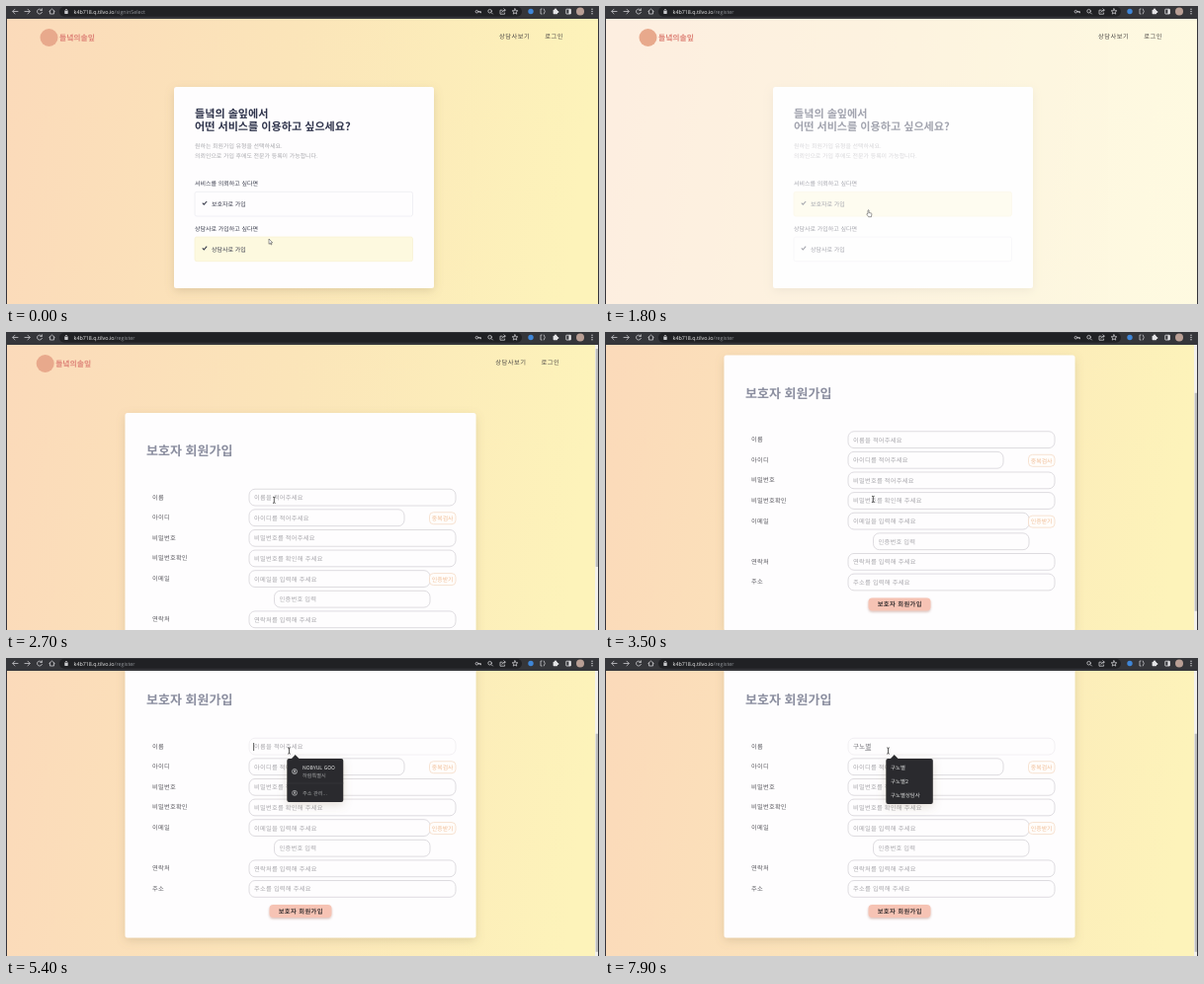
An HTML page that plays this animation: 600x302 px, repeating every 8 s.

```html
<!DOCTYPE html>
<html lang="ko">
<head>
<meta charset="utf-8">
<title>Sign-up flow</title>
<style>
  html, body { margin: 0; width: 100%; height: 100%; overflow: hidden; background: #fff; }
  svg { display: block; width: 100%; height: 100%; }
  text { font-family: "Noto Sans CJK KR", "Noto Sans CJK", "Noto Sans KR", sans-serif; text-rendering: geometricPrecision; white-space: pre; }
  .url { font-family: "Open Sans", "Noto Sans", sans-serif; }
  .icon { fill: none; stroke: #c9cacd; stroke-width: .8; stroke-linecap: round; stroke-linejoin: round; }
  .pointer { fill: #fff; stroke: #444; stroke-width: .55; }
</style>
</head>
<body>
<svg id="stage" viewBox="0 0 600 302" preserveAspectRatio="none">
  <defs>
    <linearGradient id="warm" x2="1" y2=".06">
      <stop stop-color="#fbdaba"/><stop offset=".5" stop-color="#fbe5b9"/><stop offset="1" stop-color="#fdf3ba"/>
    </linearGradient>
    <filter id="soft" x="-20%" y="-20%" width="140%" height="150%">
      <feDropShadow dx="0" dy="3" stdDeviation="5" flood-color="#8c7a55" flood-opacity=".24"/>
    </filter>
    <filter id="lift" x="-20%" y="-40%" width="140%" height="220%">
      <feDropShadow dx="0" dy="1.3" stdDeviation="1.2" flood-color="#a06050" flood-opacity=".4"/>
    </filter>
    <clipPath id="viewport"><rect y="13" width="600" height="289"/></clipPath>
  </defs>
  <rect width="600" height="302" fill="#fff"/>
  <g clip-path="url(#viewport)">
    <g id="view">
      <rect width="600" height="302" fill="url(#warm)"/>
      <g id="select"></g>
      <g id="register"></g>
    </g>
    <g id="header"></g>
    <g id="scrollbar">
      <rect x="596" y="12" width="4" height="290" fill="#f3f1ec"/>
      <rect id="thumb" x="596.7" width="2.3" height="221" fill="#bdbdbd"/>
    </g>
    <path d="M.5 12V302M599.5 12V302" stroke="#35343a"/>
  </g>
  <g id="bar"></g>
  <g id="popups"></g>
  <g id="arrow"><path class="pointer" d="M0 0V5.3L1.3 4.2 2.1 6 2.9 5.7 2.1 3.9H3.7Z"/></g>
  <g id="hand"><path class="pointer" d="M0 .6Q.6-.2 1.1.6V3L3.4 3.5Q4 3.7 3.9 4.6L3.4 7.2H.7L-1.2 4.6Q-.9 3.4 0 4Z"/></g>
  <g id="beam"><path d="M-1.3-3.1Q0-3.1 0-2.4Q0-3.1 1.3-3.1M0-2.4V2.4M-1.3 3.1Q0 3.1 0 2.4Q0 3.1 1.3 3.1" fill="none" stroke="#333" stroke-width=".8"/></g>
</svg>
<script>
const $ = id => document.getElementById(id);
const LOOP = 8000, MAX_SCROLL = 78;
const SITE = "들녘의 솔잎", NAME = "구노별";

// y is the vertical centre of the glyphs
const text = (x, y, s, size, fill, extra = "") =>
  `<text x="${x}" y="${y + size * .38}" font-size="${size}" fill="${fill}" ${extra}>${s}</text>`;
const box = (x, y, w, h, r, fill, stroke = "none", extra = "") =>
  `<rect x="${x}" y="${y}" width="${w}" height="${h}" rx="${r}" fill="${fill}" stroke="${stroke}" stroke-width=".8" ${extra}/>`;
const show = (id, on) => $(id).setAttribute("display", on ? "inline" : "none");
const move = (id, x, y) => $(id).setAttribute("transform", `translate(${x} ${y})`);

const BOLD = 'font-weight="700"', MEDIUM = 'font-weight="500"';
const SPACED = 'letter-spacing=".22"';

function buildBar() {
  const icon = d => `<path class="icon" d="${d}"/>`;
  $("bar").innerHTML =
    box(0, 0, 600, 13, 0, "#35363a") + box(54, .8, 468, 10, 5, "#202124") +
    icon("M12 5.5H7M9 3.2L6.7 5.5 9 7.8") +
    icon("M19 5.5H24M22 3.2L24.3 5.5 22 7.8") +
    icon("M36 4A2.5 2.5 0 1 0 36.4 6.4M36.4 2.8V4.5H34.7") +
    icon("M43.7 5.5L46.5 3 49.3 5.5M44.5 5V8H48.5V5") +
    box(59.3, 5, 3.4, 3, .4, "#c9cacd") + icon("M60 5V4Q61 2.4 62 4V5") +
    `<text class="url" x="68.6" y="7.5" font-size="5.35" fill="#f1f1f1">k4b718.q.tilvo.io<tspan id="path" fill="#92959a"></tspan></text>` +
    `<g id="key"><circle class="icon" cx="476.4" cy="5.7" r="1.3"/>${icon("M478 5.7H480.5V6.8M479.2 5.7V6.6")}</g>` +
    `<circle class="icon" cx="489.6" cy="5.2" r="1.8"/>` + icon("M491.2 6.8L492.4 8") +
    icon("M502 4.2H500V8.2H504.6V7M501.8 6.2Q502 4.2 505 4.2M503.8 2.8L505.3 4.2 503.8 5.6") +
    icon("M515 2.8L515.8 4.7 517.8 4.8 516.2 6.1 516.8 8.1 515 7 513.2 8.1 513.8 6.1 512.2 4.8 514.2 4.7Z") +
    `<circle cx="531" cy="5.5" r="2.7" fill="#3f86d8"/>` +
    icon("M542 3H541V8H542M544.3 3Q546.4 5.5 544.3 8") +
    box(553.6, 3.8, 4.4, 4.4, .6, "#e4e4e6") + `<circle cx="556" cy="3.5" r="1.1" fill="#e4e4e6"/><circle cx="558.3" cy="6" r="1.1" fill="#e4e4e6"/>` +
    box(566.8, 3.2, 4.6, 4.8, .3, "none", "#e4e4e6") + box(569.4, 3.2, 2, 4.8, 0, "#e4e4e6") +
    `<circle cx="581" cy="5.5" r="4" fill="#b99f95"/>` +
    [3.3, 5.5, 7.7].map(y => `<circle cx="593" cy="${y}" r=".7" fill="#d5d6d9"/>`).join("");
}

function buildHeader() {
  const nav = 'letter-spacing=".5" font-weight="500"';
  $("header").innerHTML =
    `<circle cx="43.5" cy="32" r="9" fill="#e8a98c"/>` +
    text(54, 32.5, SITE.replace(" ", ""), 7.8, "#de8478", BOLD) +
    text(499, 31, "상담사보기", 6.25, "#4a4744", nav) + text(545.3, 31, "로그인", 6.25, "#4a4744", nav);
}

function buildSelect() {
  const option = (id, y, label, choice) =>
    text(191, y - 8.5, label, 6, "#393c4c", MEDIUM) +
    box(191, y, 220.5, 24.7, 2, "#fefdfe", "#ededf1", `id="${id}"`) +
    `<path d="M198.8 ${y + 11.3}L200.3 ${y + 12.9} 203.2 ${y + 9.7}" fill="none" stroke="#393c4c" stroke-width="1.1"/>` +
    text(208, y + 12.4, choice, 6, "#393c4c", MEDIUM);
  $("select").innerHTML =
    box(170, 82, 263, 204, 2.5, "#fefdfe", "none", 'filter="url(#soft)"') +
    text(191, 108.4, SITE + "에서", 11.08, "#2f344c", BOLD) +
    text(191, 121.9, "어떤 서비스를 이용하고 싶으세요?", 11.08, "#2f344c", BOLD) +
    text(191, 142, "원하는 회원가입 유형을 선택하세요.", 5.94, "#a9a9ae") +
    text(191, 152, "의뢰인으로 가입 후에도 전문가 등록이 가능합니다.", 5.94, "#a9a9ae") +
    option("guardian", 188.3, "서비스를 의뢰하고 싶다면", "보호자로 가입") +
    option("counselor", 234, "상담사로 가입하고 싶다면", "상담사로 가입");
}

function buildRegister() {
  const rowY = i => 167.7 + 20.62 * i;
  const rows = [
    ["이름", "이름을 적어주세요"],
    ["아이디", "아이디를 적어주세요", 246, 403, "중복검사"],
    ["비밀번호", "비밀번호를 적어주세요"],
    ["비밀번호확인", "비밀번호를 확인해 주세요"],
    ["이메일", "이메일을 입력해 주세요", 246, 429, "인증받기"],
    ["", "인증번호 입력", 271.5, 429],
    ["연락처", "연락처를 입력해 주세요"],
    ["주소", "주소를 입력해 주세요"]
  ];
  const field = ([label, hint, left = 246, right = 455, action], i) => {
    const y = rowY(i);
    const button = action ? box(428.5, y - 5.6, 26.5, 12, 4, "#fffdfb", "#f5dcc8") +
      text(430.8, y + .4, action, 5.9, "#f0bd96") : "";
    return text(148, y - .5, label, 6.25, "#5b5a60", SPACED) +
      box(left, y - 8.5, right - left, 16.8, 6, "#fefdfe", "#d6d3d9", `id="input${i}"`) +
      text(left + 5, y, hint, 6.25, "#a8a7ac", `${SPACED} id="hint${i}"`) + button;
  };
  $("register").innerHTML =
    box(120.5, 82, 355, 279.5, 2.5, "#fefdfe", "none", 'filter="url(#soft)"') +
    text(142, 120.3, "보호자 회원가입", 13, "#8c8fa0", BOLD) +
    rows.map(field).join("") +
    text(251, rowY(0), "", 6.6, "#77767c", 'id="typed"') +
    box(250.3, 164, .8, 8, 0, "#333", "none", 'id="caret"') +
    box(263.6, 171.3, 6, .6, 0, "#77767c", "none", 'id="underline"') +
    box(266.5, 328, 63, 13, 4, "#f6c3b4", "none", 'filter="url(#lift)"') +
    text(275.7, 334.5, "보호자 회원가입", 6.25, "#3b3434", `letter-spacing=".4" ${BOLD}`);
}

function buildPopups() {
  const panel = (id, w, h, content) =>
    `<g id="${id}" filter="url(#soft)"><path d="M288.5 102.5L292.7 98 297 102.5Z" fill="#292a2d"/>${box(284.3, 102, w, h, 2, "#292a2d")}${content}</g>`;
  const list = items => items.map((s, i) => text(289, 111 + 14 * i, s, 5.4, "#e3e3e4")).join("");
  const person = (y, c) => `<circle cx="292" cy="${y}" r="2.5" fill="none" stroke="${c}" stroke-width=".7"/><circle cx="292" cy="${y - .6}" r=".9" fill="${c}"/><path d="M290.4 ${y + 1.5}Q292 ${y} 293.6 ${y + 1.5}" stroke="${c}" stroke-width=".7" fill="none"/>`;
  $("popups").innerHTML =
    panel("address", 57, 44, person(115, "#c8c8ca") +
      text(300, 111, "NOBYUL GOO", 5.2, "#ececec") + text(300, 119.3, "하람특별시", 5.2, "#a5a5a8") +
      box(284.3, 126.7, 57, .5, 0, "#3d3e41") +
      person(136.8, "#b5b5b8") + text(300, 136.8, "주소 관리...", 5.2, "#a5a5a8")) +
    panel("latin", 33.5, 32, list(["rnshquf", "rrr"])) +
    panel("hangul", 47.5, 46, list([NAME, NAME + "2", NAME + "상담사"]));
}

const clamp = v => Math.max(0, Math.min(1, v));
const ramp = (t, from, to) => clamp((t - from) / (to - from));
const ease = p => p * p * (3 - 2 * p);

// time, x, y of each resting point; the pointer eases between them
const pointerKeys = [
  [100, 266, 236], [1100, 266, 206.5], [2200, 266, 206.5], [2650, 271.3, 170.3],
  [3700, 271.3, 169.3], [4200, 284.3, 91], [4600, 284.3, 91], [5200, 286.5, 94]
];
function pointerAt(t) {
  let [, x, y] = pointerKeys[0];
  for (let i = 1; i < pointerKeys.length; i++) {
    const [from] = pointerKeys[i - 1], [to, nx, ny] = pointerKeys[i];
    const p = ease(ramp(t, from, to));
    x += (nx - x) * p;
    y += (ny - y) * p;
  }
  return [x, y];
}

const typing = ["ㄱ", "구", "군", "구노", "구놉", "구노벼", NAME];
function typedAt(t) {
  if (t < 5900) return "";
  if (t < 6900) return "r";
  return typing[Math.min(typing.length - 1, Math.floor((t - 7200) / 100))] || "";
}

function setHover(id, on) {
  $(id).setAttribute("fill", on ? "#fdf9df" : "#fefdfe");
  $(id).setAttribute("stroke", on ? "#f8f2d4" : "#ededf1");
}

function render(t) {
  const registered = t >= 2000;
  const scroll = MAX_SCROLL * ease(ramp(t, 3050, 3720));
  const [x, y] = pointerAt(t);

  $("path").textContent = t < 1600 ? "/signinSelect" : "/register";
  show("key", t < 5900);
  show("select", !registered);
  show("register", registered);
  show("scrollbar", registered);
  $("view").setAttribute("opacity", registered ? ramp(t, 2000, 2450) : 1 - ramp(t, 1550, 2000));
  move("register", 0, -scroll);
  move("header", registered ? -3.8 : 0, -scroll);
  $("thumb").setAttribute("y", 17 + scroll * .766);

  setHover("guardian", y > 188 && y < 213);
  setHover("counselor", y > 234);

  const typed = typedAt(t), focused = t >= 4300;
  $("input0").setAttribute("stroke", focused ? "#efecf0" : "#d6d3d9");
  $("typed").textContent = typed;
  show("hint0", !typed);
  show("caret", focused && !typed && (t < 4900 || t >= 5400));
  const composing = typed && typed !== "r";
  show("underline", composing);
  if (composing) $("underline").setAttribute("x", 251 + (typed.length - 1) * 6.07);

  show("address", t >= 4350 && t < 5900);
  show("latin", typed === "r");
  show("hangul", composing);

  const kind = t < 700 ? "arrow" : t < 2000 ? "hand" : t < 2550 ? "arrow" : "beam";
  for (const id of ["arrow", "hand", "beam"]) show(id, id === kind);
  move(kind, x, y);
}

buildBar();
buildHeader();
buildSelect();
buildRegister();
buildPopups();

const start = performance.now();
function tick() {
  render((performance.now() - start) % LOOP);
  requestAnimationFrame(tick);
}
tick();
</script>
</body>
</html>
```
